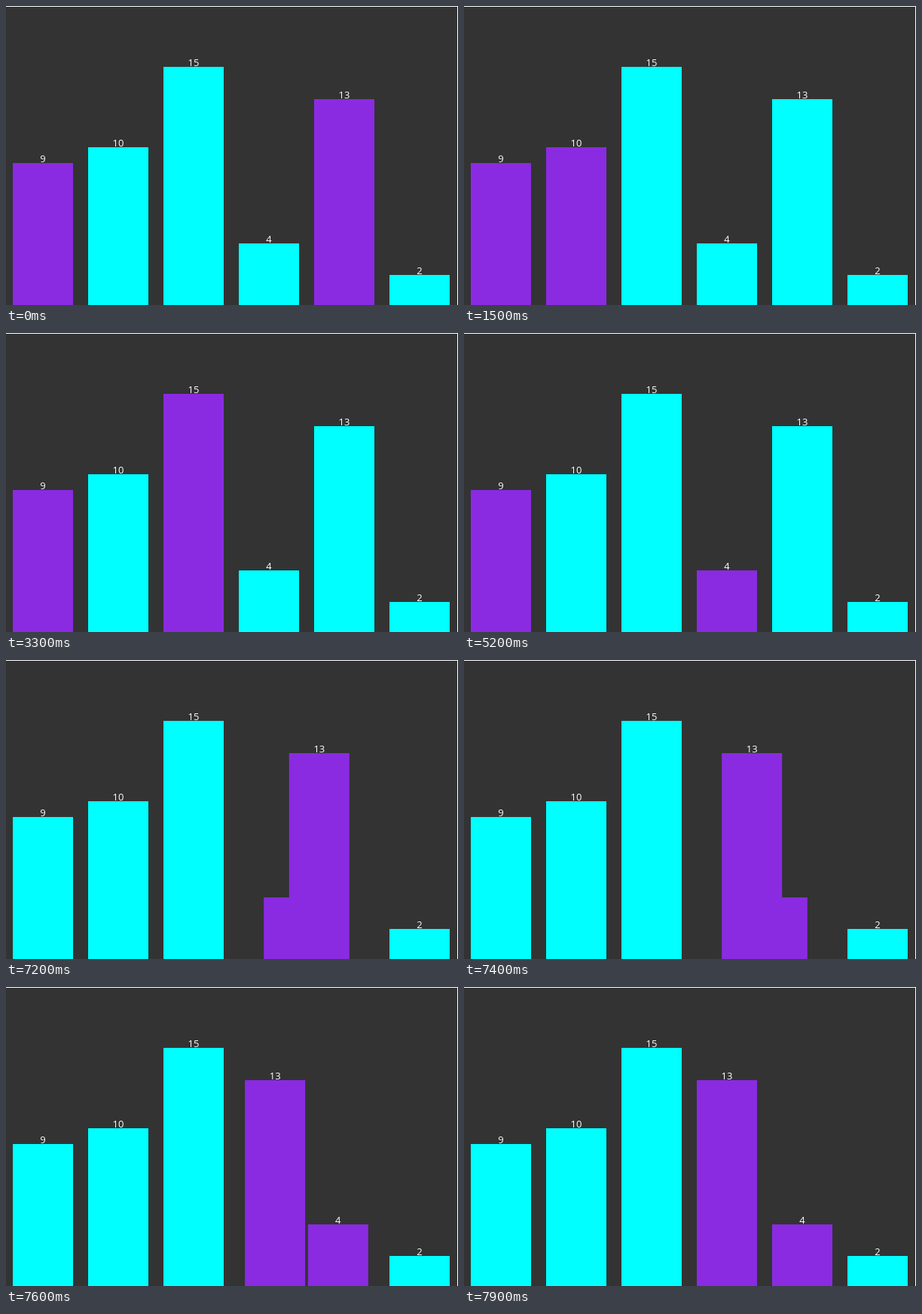
These frames come from a looping animation (600x398 px, 8000 ms). An HTML page with a canvas:

```html
<!DOCTYPE html>
<html>
<head>
<meta charset="utf-8">
<style>
html, body { margin: 0; height: 100%; overflow: hidden; background: #fff; }
canvas { display: block; }
</style>
</head>
<body>
<canvas width="600" height="398"></canvas>
<script>
const ctx = document.querySelector('canvas').getContext('2d');
const values = [9, 10, 15, 4, 13, 2];
const LOOP = 8000, SWAP = 7000, TICK = 100;

// Pairs of bars being compared, with the time each pair lights up
const steps = [[0, [0, 4]], [1500, [0, 1]], [3300, [0, 2]], [5200, [0, 3]], [SWAP, [3, 4]]];

// cubic-bezier(.42, 0, .58, 1)
function easeInOut(x) {
  let lo = 0, hi = 1;
  for (let i = 0; i < 30; i++) {
    const u = (lo + hi) / 2, v = 1 - u;
    if (3 * v * v * u * 0.42 + 3 * v * u * u * 0.58 + u ** 3 < x) lo = u;
    else hi = u;
  }
  return lo * lo * (3 - 2 * lo);
}

function swapOffset(t) {
  if (t < SWAP) return 0;
  const progress = 0.2 + Math.floor((t - SWAP) / TICK) * 0.1;
  return progress > 0.999 ? 100 : 100 * easeInOut(progress);
}

function drawBar(value, x, active) {
  const top = Math.round(401 - value * 64 / 3);
  ctx.fillStyle = active ? '#8a2be2' : '#0ff';
  ctx.fillRect(x, top, 80, 398 - top);
  ctx.fillStyle = '#fff';
  ctx.fillText(value, x + 40, top - 1);
}

function draw(t) {
  ctx.fillStyle = '#fff';
  ctx.fillRect(0, 0, 600, 398);
  ctx.fillStyle = '#333';
  ctx.fillRect(0, 1, 599, 397);
  ctx.font = '13px "Open Sans", "Noto Sans", sans-serif';
  ctx.textAlign = 'center';
  const active = steps.filter(([start]) => start <= t).pop()[1];
  const offset = swapOffset(t);
  values.forEach((value, i) => {
    const shift = i === 3 ? offset : i === 4 ? -offset : 0;
    drawBar(value, 9 + i * 100 + shift, active.includes(i));
  });
}

function frame() {
  draw(performance.now() % LOOP);
  requestAnimationFrame(frame);
}
frame();
</script>
</body>
</html>
```
